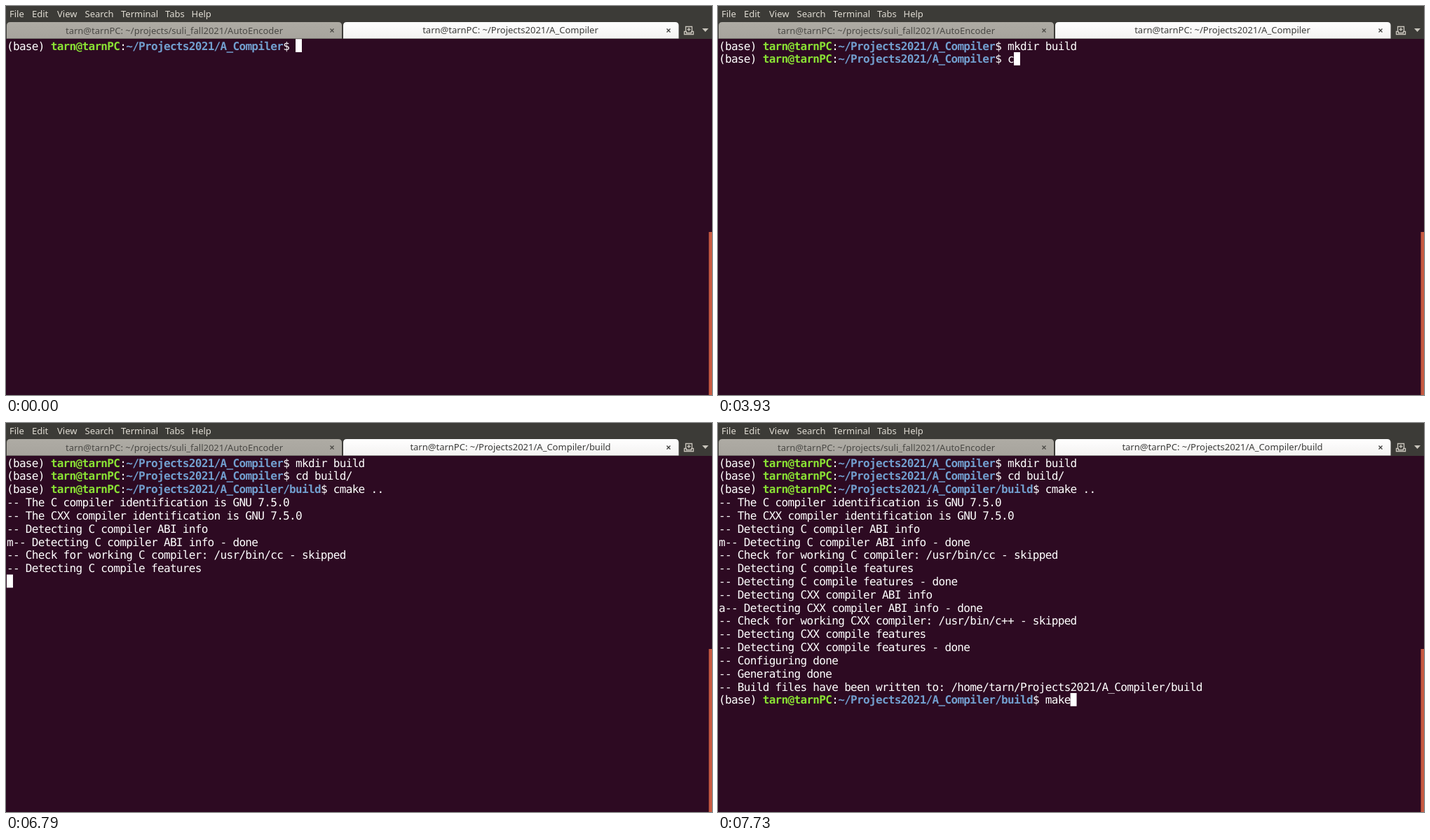
Write an HTML page that moves like this. It is 1007 px wide and 556 px high and loops after 8 s.

```html
<!DOCTYPE html>
<html lang="en">
<head>
<meta charset="utf-8">
<title>Terminal build session</title>
<style>
  html, body { margin: 0; width: 100%; height: 100%; overflow: hidden; background: #2d0a22; }
  svg { display: block; width: 1007px; height: 556px; }
  text { white-space: pre; }
  .ui { font: 13px "Noto Sans", "Open Sans", sans-serif; fill: #dfdbd2; }
  .tab { text-anchor: middle; }
  .active { fill: #3c3c3a; }
  .idle { fill: #4a4945; }
  #screen { font: 16px "DejaVu Sans Mono", monospace; fill: #fff; text-rendering: geometricPrecision; }
  .user { fill: #8ae234; font-weight: bold; }
  .path { fill: #729fcf; font-weight: bold; }
</style>
</head>
<body>
<svg viewBox="0 0 1007 556">
  <defs>
    <linearGradient id="light" x2="0" y2="1"><stop stop-color="#fff"/><stop offset="1" stop-color="#f3f2f1"/></linearGradient>
    <linearGradient id="dim" x2="0" y2="1"><stop stop-color="#aeaba4"/><stop offset="1" stop-color="#a7a49d"/></linearGradient>
  </defs>
  <rect width="1007" height="556" fill="#2d0a22"/>
  <rect width="1007" height="47" fill="#3c3b37"/>
  <g class="ui" id="menu"></g>
  <path d="M1 46.500V28q0-5 5-5H474q5 0 5 5V46.500z" fill="url(#dim)"/>
  <path d="M481 46.500V28q0-5 5-5H954.500q5 0 5 5V46.500z" fill="url(#light)"/>
  <g class="ui tab">
    <text class="idle" x="240" y="40">tarn@tarnPC: ~/projects/suli_fall2021/AutoEncoder</text>
    <text class="active" x="719.5" y="39" id="title"></text>
  </g>
  <path d="M462.500 32.500l5 5m0-5l-5 5" stroke="#4a4945" stroke-width="1.300"/>
  <path d="M942.500 32.500l5 5m0-5l-5 5" stroke="#3c3c3a" stroke-width="1.300"/>
  <path d="M969.500 36.500v-7h9v7M967.500 36.500h3v2h7v-2h3v4h-13zM971.500 33.500h5m-2.500-2.500v5" fill="none" stroke="#c9c5bc" stroke-width="1.300"/>
  <path d="M993 32h9l-4.500 5z" fill="#c9c5bc"/>
  <rect x="1002.5" y="323" width="4.5" height="233" fill="#c85a42"/>
  <g id="screen"></g>
  <rect id="cursor" width="8.96" height="18.82" fill="#fff"/>
</svg>
<script>
const LOOP = 8000, CELL = 8.957, ROW = 18.82, LEFT = 1, TOP = 47.2, BASELINE = 62.6;
const USER = 'tarn@tarnPC', HOME = '~/Projects2021/A_Compiler', BUILD = HOME + '/build';
const ON = true, OFF = false;
const $ = id => document.getElementById(id);

const prompt = dir => `(base) ${USER}:${dir}$ `;

// [time, appended output, cursor shown]
const steps = [
  [0, prompt(HOME), ON],
  [530, 'm', ON], [670, 'k', ON], [810, 'd', ON], [920, 'i', ON], [1110, 'r', ON],
  [1290, ' ', OFF], [1430, 'b', OFF], [1690, 'u', OFF], [1870, 'i', OFF], [2050, 'l', OFF], [2190, 'd', OFF],
  [2510, '\n' + prompt(HOME), ON],
  [3930, 'c', ON], [4140, 'd', ON], [4250, ' ', ON], [4440, 'b', ON], [4570, 'uild/', ON],
  [4780, '\n', ON],
  [4880, prompt(BUILD), ON],
  [5260, 'c', ON], [5390, 'm', ON], [5510, 'a', OFF], [5650, 'k', OFF], [5760, 'e', OFF],
  [5900, ' ', OFF], [6050, '.', OFF], [6190, '.', ON],
  [6430, '\n', ON],
  [6500, '-- The C compiler identification is GNU 7.5.0\n', ON],
  [6570, '-- The CXX compiler identification is GNU 7.5.0\n', ON],
  [6600, '-- Detecting C compiler ABI info\n', ON],
  [6690, 'm', ON],
  [6750, '-- Detecting C compiler ABI info - done\n', ON],
  [6770, '-- Check for working C compiler: /usr/bin/cc - skipped\n-- Detecting C compile features\n', ON],
  [6800, '-- Detecting C compile features - done\n-- Detecting CXX compiler ABI info\n', ON],
  [6930, 'a', OFF],
  [7150, '-- Detecting CXX compiler ABI info - done\n', OFF],
  [7170, '-- Check for working CXX compiler: /usr/bin/c++ - skipped\n', OFF],
  [7270, '-- Detecting CXX compile features\n-- Detecting CXX compile features - done\n', OFF],
  [7300, '-- Configuring done\n', OFF],
  [7350, '-- Generating done\n-- Build files have been written to: /home/tarn/Projects2021/A_Compiler/build\n', OFF],
  [7380, prompt(BUILD) + 'ma', ON],
  [7560, 'k', ON],
  [7730, 'e', ON]
];

function addText(parent, tag, content, attrs = {}) {
  const node = document.createElementNS('http://www.w3.org/2000/svg', tag);
  for (const key in attrs) node.setAttribute(key, attrs[key]);
  node.textContent = content;
  return parent.appendChild(node);
}

function drawLine(line, row) {
  const text = addText($('screen'), 'text', '', { x: LEFT, y: Math.round(BASELINE + row * ROW) });
  const parts = line.match(/^(\(base\) )([^:]+)(:)([^$]+)(\$.*)$/);
  if (!parts) { text.textContent = line; return; }
  ['', 'user', '', 'path', ''].forEach((style, i) => addText(text, 'tspan', parts[i + 1], { class: style }));
}

function render(index) {
  const lines = steps.slice(0, index + 1).map(step => step[1]).join('').split('\n');
  const row = lines.length - 1;
  $('screen').replaceChildren();
  lines.forEach(drawLine);
  $('title').textContent = `${USER}: ${steps[index][0] < 4880 ? HOME : BUILD}`;
  $('cursor').setAttribute('x', LEFT + lines[row].length * CELL);
  $('cursor').setAttribute('y', TOP + row * ROW);
  $('cursor').setAttribute('visibility', steps[index][2] ? 'visible' : 'hidden');
}

const menu = { File: 5, Edit: 37, View: 73, Search: 112.5, Terminal: 164, Tabs: 227, Help: 264.5 };
for (const name in menu) addText($('menu'), 'text', name, { x: menu[name], y: 16 });

// Fit the font's advance to the terminal's character grid.
const advance = addText($('screen'), 'text', '0'.repeat(100)).getComputedTextLength() / 100;
$('screen').style.letterSpacing = `${CELL - advance}px`;

let shown = -1;
function tick() {
  const time = performance.now() % LOOP;
  const index = steps.findLastIndex(step => step[0] <= time);
  if (index !== shown) render(shown = index);
  requestAnimationFrame(tick);
}
tick();
</script>
</body>
</html>
```
